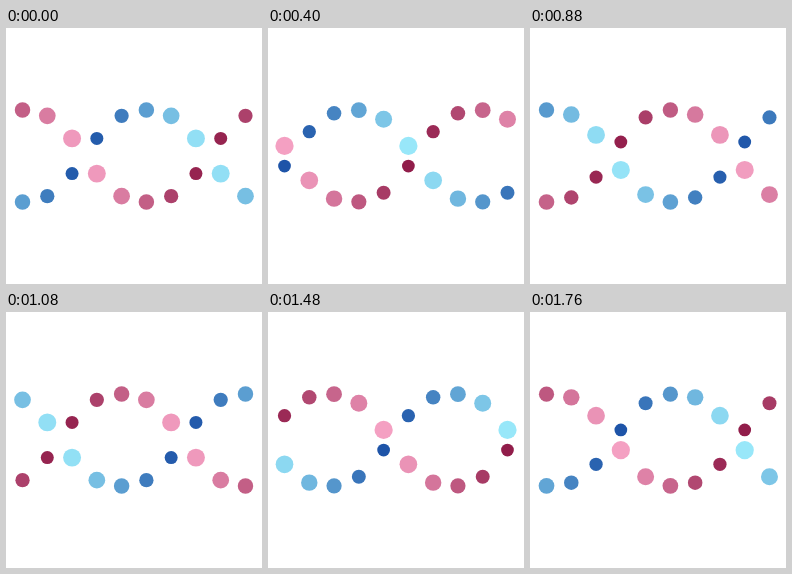
These frames come from a looping animation (256x256 px, 1800 ms). An HTML page:

```html
<!DOCTYPE html>
<html lang="en">
<head>
<meta charset="utf-8">
<title>Double helix loader</title>
<style>
  html, body { margin: 0; width: 100%; height: 100%; overflow: hidden; background: #fff; }
  svg { display: block; width: 100%; height: 100%; }
</style>
</head>
<body>
<svg id="stage" viewBox="0 0 100 100"></svg>
<script>
const PERIOD = 1800, STEP = 40, COLUMNS = 10;
const UNIT = 100 / 15.5;
const TOP = 32, BOTTOM = 68;
const R_MIN = UNIT * 0.375, R_MAX = UNIT * 0.5625;

const strands = [
  { offset: 0, far: [139, 21, 67], near: [250, 168, 201] },
  { offset: 0.5, far: [22, 75, 163], near: [160, 240, 254] }
];

const stage = document.getElementById('stage');
const mix = (a, b, k) => a + (b - a) * k;
const wrap = p => p - Math.floor(p);
const triangle = p => 1 - Math.abs(2 * wrap(p) - 1);

// cubic-bezier(0.5, 0, 0.5, 1)
function ease(x) {
  let lo = 0, hi = 1;
  for (let i = 0; i < 24; i++) {
    const s = (lo + hi) / 2;
    if (1.5 * s * (1 - s) + s ** 3 < x) lo = s; else hi = s;
  }
  return lo * lo * (3 - 2 * lo);
}

const dots = strands.flatMap(strand =>
  Array.from({ length: COLUMNS }, (_, i) => {
    const node = document.createElementNS('http://www.w3.org/2000/svg', 'circle');
    node.setAttribute('cx', UNIT * (1 + 1.5 * i));
    stage.append(node);
    return { node, strand, offset: strand.offset + i / COLUMNS };
  }));

function render(time) {
  const turn = Math.floor(time % PERIOD / STEP) * STEP / PERIOD;
  for (const { node, strand, offset } of dots) {
    const phase = turn + offset;
    const depth = triangle(phase + 0.25);
    const color = strand.far.map((c, i) => Math.round(mix(c, strand.near[i], depth)));
    node.setAttribute('cy', mix(TOP, BOTTOM, ease(triangle(phase))));
    node.setAttribute('r', mix(R_MIN, R_MAX, depth));
    node.setAttribute('fill', `rgb(${color})`);
  }
}

const start = performance.now();
function tick() {
  render(performance.now() - start);
  requestAnimationFrame(tick);
}
tick();
</script>
</body>
</html>
```
